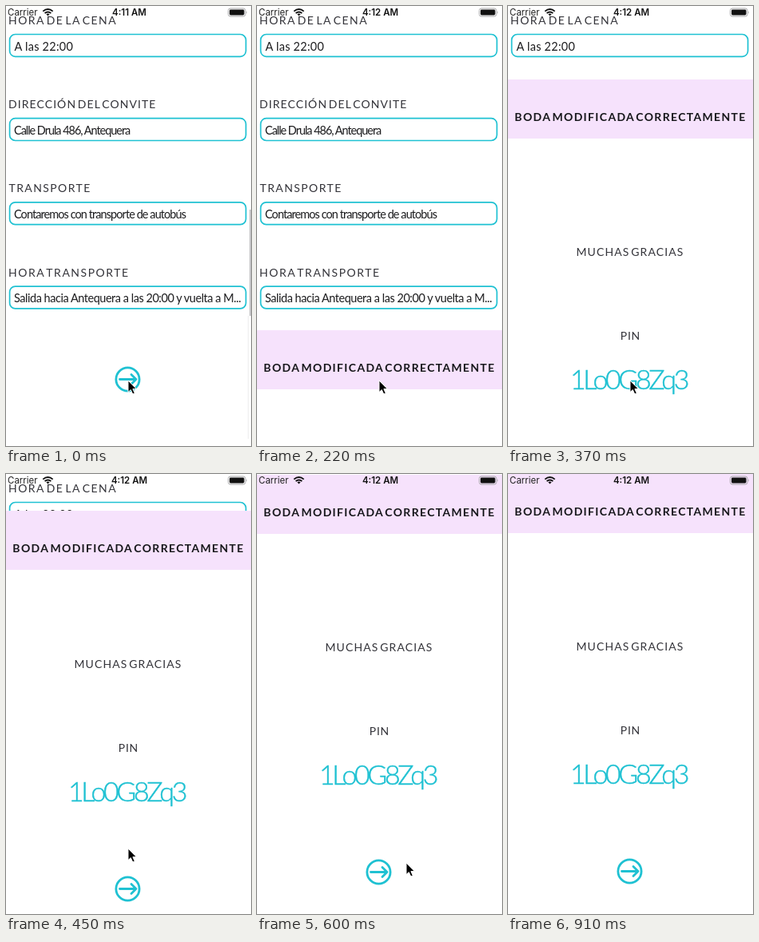
Animation of 307x551 px, one loop 1.77 s. Source, as an HTML page:

```html
<!DOCTYPE html>
<html lang="es">
<head>
<meta charset="utf-8">
<title>Boda</title>
<style>
  html, body { margin: 0; width: 100%; height: 100%; overflow: hidden; background: #fff; }
  svg { display: block; width: 100vw; height: 100vh; }

  .label, .value, .pin { font-family: Lato, "Open Sans", sans-serif; }
  .label { font-size: 14px; fill: #34343a; word-spacing: -3px; }
  .value { font-size: 14.5px; fill: #1c1c1e; }
  .title { font-size: 14px; font-weight: 700; fill: #17171b; letter-spacing: 1.32px; }
  .pin { font-size: 34px; font-weight: 300; fill: #1fc1d2; stroke: #1fc1d2; stroke-width: .5; letter-spacing: -3.4px; }
  .mid { text-anchor: middle; }
  .status { font: 11.5px Inter, "Liberation Sans", sans-serif; fill: #222; }
  .clock { font-weight: 600; text-anchor: middle; fill: #111; }
  .line { fill: none; stroke: #1fc1d2; stroke-width: 1.7; }
  .icon { fill: none; stroke: #1fc1d2; stroke-width: 2.8; stroke-linecap: round; stroke-linejoin: round; }

  .sheet, .body, .pointer, .early, .late { animation: 1770ms step-end infinite; }
  .sheet { animation-name: rise; }
  .body { animation-name: lead; }
  .pointer { animation-name: leave; }
  .early { animation-name: early; }
  .late { animation-name: late; }

  @keyframes rise {
    0%      { transform: translateY(551px); }
    7.9%    { transform: translateY(528px); }
    12.42%  { transform: translateY(406px); }
    16.94%  { transform: translateY(183px); }
    20.9%   { transform: translateY(92px); }
    25.42%  { transform: translateY(46px); }
    29.94%  { transform: translateY(8px); }
    33.89%  { transform: translateY(1px); }
    38.41%, 100% { transform: translateY(0); }
  }
  /* the content runs ahead of the banner for one step */
  @keyframes lead {
    0%      { transform: translateY(0); }
    25.42%  { transform: translateY(-24px); }
    29.94%, 100% { transform: translateY(0); }
  }
  @keyframes leave {
    0%      { transform: translate(153px, 469px); }
    29.94%  { transform: translate(159px, 472px); }
    33.89%  { transform: translate(187px, 487px); }
    38.41%  { transform: translate(236px, 513px); }
    42.93%  { transform: translate(288px, 541px); }
    47.45%, 100% { transform: translate(330px, 570px); }
  }
  @keyframes early { 0% { opacity: 1; } 3.38%, 100% { opacity: 0; } }
  @keyframes late { 0% { opacity: 0; } 3.38%, 100% { opacity: 1; } }
</style>
</head>
<body>
<svg viewBox="0 0 307 551" preserveAspectRatio="none">
  <defs>
    <rect id="field" class="line" x="4.6" y="35.5" width="296" height="27.8" rx="7"/>
    <g id="next" class="icon">
      <circle r="14.6"/>
      <path d="M-10 0H10.5M4.5-6L10.5 0L4.5 6"/>
    </g>
  </defs>

  <rect width="307" height="551" fill="#fff"/>

  <!-- form -->
  <use href="#field"/>
  <use href="#field" y="105.2"/>
  <use href="#field" y="210.4"/>
  <use href="#field" y="315.6"/>
  <g class="label">
    <text x="3" y="22.5" letter-spacing="1.48">HORA DE LA CENA</text>
    <text x="3" y="128" letter-spacing="1.07">DIRECCIÓN DEL CONVITE</text>
    <text x="3.5" y="233.3" letter-spacing="1.4">TRANSPORTE</text>
    <text x="3" y="338.8" letter-spacing="1.5">HORA TRANSPORTE</text>
  </g>
  <g class="value">
    <text x="10.5" y="55.8" letter-spacing=".24">A las 22:00</text>
    <text x="10" y="161" letter-spacing="-1.04">Calle Drula 486, Antequera</text>
    <text x="10" y="266.2" letter-spacing="-.93">Contaremos con transporte de autobús</text>
    <text x="10" y="371.3" letter-spacing="-.47">Salida hacia Antequera a las 20:00 y vuelta a M...</text>
  </g>
  <use href="#next" x="152.5" y="467.5"/>
  <g class="early">
    <rect x="305" y="255" width="2" height="133" fill="#c9c9cb"/>
    <rect x="303" y="388" width="1" height="154" fill="#ededee"/>
  </g>

  <!-- confirmation -->
  <g class="sheet">
    <rect width="307" height="600" fill="#fff"/>
    <rect width="307" height="74" fill="#f6e2fc"/>
    <text class="label title mid" x="153.5" y="51.7">BODA MODIFICADA CORRECTAMENTE</text>
    <g class="body">
      <text class="label mid" x="153" y="221" letter-spacing="1.1">MUCHAS GRACIAS</text>
      <text class="label mid" x="153.4" y="326.3" letter-spacing=".8">PIN</text>
      <text class="pin mid" x="151" y="388">1Lo0G8Zq3</text>
      <use href="#next" x="152.5" y="497.5"/>
    </g>
  </g>

  <!-- status bar -->
  <g class="status">
    <text x="2" y="12.2">Carrier</text>
    <text class="clock early" x="154.5" y="12.2">4:11 AM</text>
    <text class="clock late" x="154.5" y="12.2">4:12 AM</text>
  </g>
  <g fill="none" stroke="#111" stroke-width="1.9">
    <path d="M46.3 6.6Q52.5 1.2 58.7 6.6M48.6 9Q52.5 5.8 56.4 9"/>
    <path d="M50.4 10.2Q52.5 8.6 54.6 10.2L52.5 12.6Z" fill="#111" stroke="none"/>
  </g>
  <rect x="278.5" y="3" width="21.5" height="10" rx="2.6" fill="none" stroke="#a6a6a8"/>
  <rect x="280" y="4.5" width="18.5" height="7" rx="1.4" fill="#111"/>
  <path d="M301.3 6.2Q303 8 301.3 9.8Z" fill="#a6a6a8"/>

  <path class="pointer" d="M0 0V14.6L3.3 11.6L5.8 17L8.3 15.9L5.9 10.6H10.4Z" fill="#000" stroke="#fff" stroke-width="1"/>
</svg>
</body>
</html>
```
